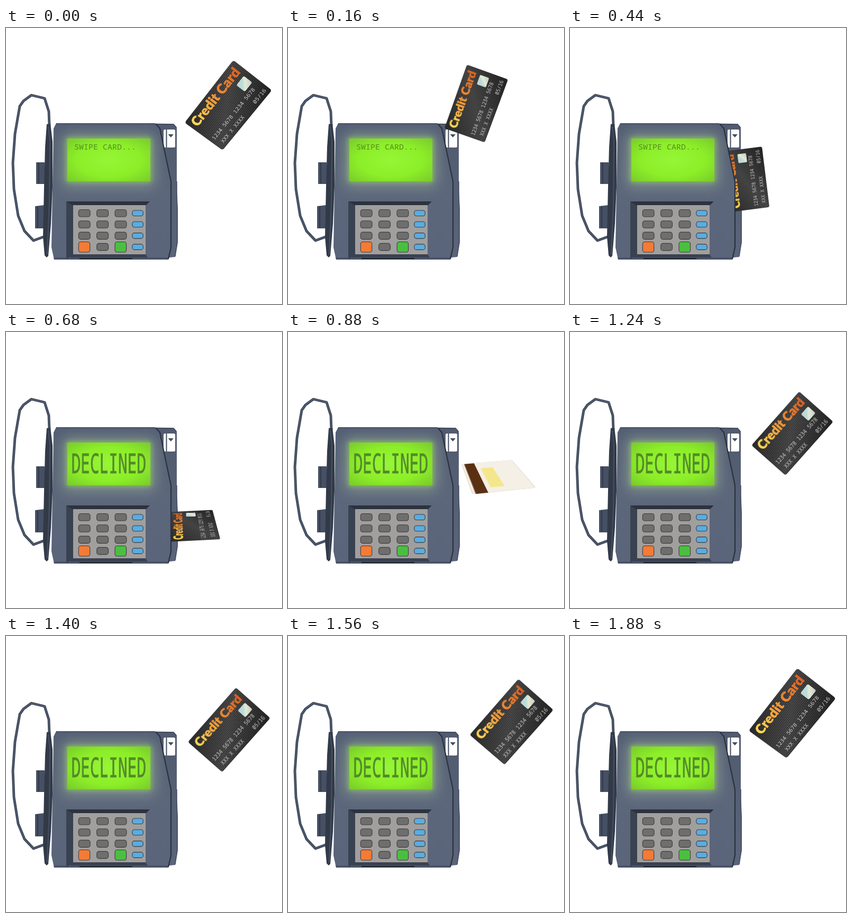
Recreate the animation shown at these times as an HTML page. Size 522x522 px, loop 1920 ms.

```html
<!DOCTYPE html>
<html lang="en">
<head>
<meta charset="utf-8">
<title>Card declined</title>
<style>
  html, body { margin: 0; width: 100%; height: 100%; overflow: hidden; background: #fff; }
  #stage { position: relative; width: 522px; height: 522px; overflow: hidden; }
  .layer { position: absolute; left: 0; top: 0; width: 522px; height: 522px; }
  #card { position: absolute; left: -68px; top: -43px; width: 136px; height: 86px; transform-origin: 50% 50%; }
  .mono { font-family: "Noto Sans Mono", "Liberation Mono", monospace; }
</style>
</head>
<body>
<div id="stage">
  <!-- handset and card slot -->
  <svg class="layer" viewBox="0 0 522 522">
    <defs>
      <linearGradient id="side" x1="0" y1="0" x2="0" y2="1">
        <stop offset="0" stop-color="#515b6f"/><stop offset="1" stop-color="#5a647a"/>
      </linearGradient>
      <path id="cord" d="M71 395L52 402L35 384L23 355L15 305L13 255L17 200L26 148L33 138L48 127L73 133L81 158L82 186"/>
    </defs>
    <g fill="none" stroke-linejoin="round">
      <use href="#cord" stroke="#394354" stroke-width="4.800"/>
      <use href="#cord" stroke="#556075" stroke-width="1.800"/>
    </g>
    <path d="M57 254H73V295H57ZM55 337L72 335V379H55Z" fill="#465064"/>
    <path d="M62 255V294M60 337V378" stroke="#323a49" stroke-width="2"/>
    <path d="M77 182L84 181L88 215V300L85 370L80 431L77 434L73 430L70 395L72 300L74 225Z" fill="#323a48"/>
    <path d="M80 186L83 215L82 330L78 428" fill="none" stroke="#465064" stroke-width="2"/>
    <path d="M280 181L317 182L323 188V310L325 345V405L320 433L300 435Z" fill="url(#side)"/>
    <path d="M285 181.500L317 182L322 188" fill="none" stroke="#3a4353" stroke-width="1.500"/>
    <path d="M323 290V310L324 345V405L320 432" fill="none" stroke="#434d60" stroke-width="1.500"/>
    <rect x="298" y="192" width="22" height="34" rx="2.500" fill="#fff"/>
    <path d="M303.500 192V226" stroke="#454d5c" stroke-width="2"/>
    <path d="M306.500 201H317L311.800 207Z" fill="#454d5c"/>
  </svg>

  <svg id="card" viewBox="0 0 136 86">
    <defs>
      <linearGradient id="black" x1="0" y1="0" x2="1" y2="1">
        <stop offset="0" stop-color="#2d2d2d"/><stop offset=".48" stop-color="#4c4c4c"/>
        <stop offset="1" stop-color="#242424"/>
      </linearGradient>
      <linearGradient id="gold" gradientUnits="userSpaceOnUse" x1="7" y1="0" x2="128" y2="0">
        <stop offset="0" stop-color="#ffdc58"/><stop offset=".45" stop-color="#f29a38"/>
        <stop offset="1" stop-color="#da5f22"/>
      </linearGradient>
      <linearGradient id="foil" x1="0" y1="0" x2="1" y2="1">
        <stop offset="0" stop-color="#c9cfd0"/><stop offset=".4" stop-color="#b9dedd"/>
        <stop offset=".55" stop-color="#e6ead0"/><stop offset="1" stop-color="#c3cacc"/>
      </linearGradient>
      <pattern id="lines" width="4" height="3" patternUnits="userSpaceOnUse">
        <rect width="4" height="1" fill="#111" opacity=".45"/>
      </pattern>
    </defs>
    <g id="front">
      <rect width="136" height="86" rx="4" fill="url(#black)"/>
      <rect width="136" height="86" rx="4" fill="url(#lines)"/>
      <text x="7" y="23.500" font-family="Lato, sans-serif" font-weight="900" font-size="23.500" fill="url(#gold)" stroke="url(#gold)" stroke-width=".5">Credit Card</text>
      <rect x="106" y="31" width="20" height="19" rx="2.500" fill="url(#foil)"/>
      <g class="mono" font-size="10" fill="#cbcbcb">
        <text x="6" y="62.500">1234 5678 1234 5678</text>
        <text x="11" y="79">XXX X XXXX</text>
        <text x="100" y="79">05/16</text>
      </g>
    </g>
    <g id="back">
      <rect x=".4" y=".4" width="135.200" height="85.200" rx="4" fill="#f4f0e6" stroke="#d3cbb9" stroke-width=".8"/>
      <rect y="4.500" width="136" height="16.500" fill="#5a3013"/>
      <rect x="31" y="27.500" width="87" height="19.500" fill="#f4e68c"/>
    </g>
  </svg>

  <!-- terminal body -->
  <svg class="layer" viewBox="0 0 522 522">
    <defs>
      <linearGradient id="shell" x1="0" y1="0" x2="0" y2="1">
        <stop offset="0" stop-color="#535e73"/><stop offset=".5" stop-color="#5c677b"/>
        <stop offset="1" stop-color="#5a647a"/>
      </linearGradient>
      <radialGradient id="lcd" cx=".5" cy=".5" r=".72">
        <stop offset="0" stop-color="#96f636"/><stop offset=".55" stop-color="#8cee28"/>
        <stop offset="1" stop-color="#78c82c"/>
      </radialGradient>
      <filter id="blur" x="-40%" y="-60%" width="180%" height="220%"><feGaussianBlur stdDeviation="13"/></filter>
      <filter id="soft" x="-20%" y="-30%" width="140%" height="160%"><feGaussianBlur stdDeviation="4"/></filter>
      <clipPath id="shellClip"><use href="#shellShape"/></clipPath>
    </defs>
    <path id="shellShape" d="M95 180H282L291 190L312 290V415L307 438H91L86 415L90 190Z" fill="url(#shell)"/>
    <g clip-path="url(#shellClip)">
      <rect x="107" y="200" width="175" height="100" rx="10" fill="#8ea295" opacity=".75" filter="url(#blur)"/>
      <rect x="114" y="207" width="161" height="85" rx="4" fill="#8cc55a" opacity=".75" filter="url(#soft)"/>
      <path d="M95 181H282" stroke="#485266" stroke-width="2"/>
      <path d="M87 434H311V439H87Z" fill="#4a5468"/>
    </g>
    <path d="M283 181L291 190L312 290V415L307 437" fill="none" stroke="#2b323e" stroke-width="2.200"/>
    <path d="M139 436H239" stroke="#20262f" stroke-width="2"/>

    <rect x="116" y="209" width="157" height="81" fill="url(#lcd)"/>
    <text id="prompt" class="mono" x="129" y="230" font-size="15" fill="#558f22">SWIPE CARD...</text>
    <text id="verdict" class="mono" transform="translate(123.500 266.500) scale(1 1.700)" font-size="29.500" fill="#55892a" stroke="#55892a" stroke-width=".6">DECLINED</text>

    <path d="M114 328H272L264 336H127V429L114 437Z" fill="#2c333f"/>
    <path d="M114 328L127 336V429L114 437Z" fill="#394251"/>
    <path d="M127 428H264L268 434H120Z" fill="#394251"/>
    <rect x="127" y="335" width="137" height="93" fill="#a19f9e"/>
    <g id="keys" stroke="#3c3c3c" stroke-width="1.100"></g>
  </svg>
</div>
<script>
const LOOP = 1920, STEP = 40, DECLINE_AT = 600;
const $ = id => document.getElementById(id);

// time, x, y, length scale, height scale, spin, tilt
const poses = [
  [0, 419.5, 148.7, 1.11, 1.065, -50.2, -14],
  [160, 355.5, 144, 0.945, 0.95, -68.3, -8],
  [440, 333, 286.5, 0.85, 0.87, -95.2, -3],
  [560, 338, 393, 0.87, 0.88, -95, 0],
  [880, 391, 270, 1.26, 1.26, -79.5, 251],
  [1120, 419, 197, 1.01, 1, -48, 355],
  [1240, 420.5, 192, 1, 1, -46.4, 359],
  [1560, 422.5, 163.5, 1.03, 1.02, -46.8, 354],
  [1880, 419.5, 148.7, 1.11, 1.065, -50.2, 346],
  [1920, 419.5, 148.7, 1.11, 1.065, -50.2, 346]
];

const slope = (i, c) => (poses[i + 1][c] - poses[i][c]) / (poses[i + 1][0] - poses[i][0]);

// monotone cubic tangents keep the motion smooth without overshoot
function tangent(i, c) {
  if (i === 0 || i === poses.length - 1) return 0;
  const a = slope(i - 1, c), b = slope(i, c);
  return a * b <= 0 ? 0 : 2 * a * b / (a + b);
}

function poseAt(t) {
  let i = 0;
  while (i < poses.length - 2 && t >= poses[i + 1][0]) i++;
  const p = poses[i], q = poses[i + 1], h = q[0] - p[0], u = (t - p[0]) / h, v = 1 - u;
  return p.slice(1).map((value, k) => {
    const c = k + 1;
    return value * v * v * (1 + 2 * u) + q[c] * u * u * (3 - 2 * u)
      + h * u * v * (v * tangent(i, c) - u * tangent(i + 1, c));
  });
}

function addKey(x, y, w, h, fill) {
  const key = document.createElementNS("http://www.w3.org/2000/svg", "rect");
  const attrs = { x, y, width: w, height: h, rx: 4, fill };
  for (const name in attrs) key.setAttribute(name, attrs[name]);
  $("keys").append(key);
}

for (let row = 0; row < 4; row++) {
  const y = 343.5 + row * 21.3;
  for (let col = 0; col < 3; col++) {
    const x = 137.3 + col * 34.4;
    if (row === 3 && col !== 1) addKey(x, 404.5, 21.5, 19.5, col ? "#4abf3f" : "#f57a35");
    else addKey(x, y, 21.8, 13.5, "#6e6e6e");
  }
  addKey(238.8, y + 1.5, 20.5, 10.5, "#58ade2");
}

function render(time) {
  const t = Math.floor(time % LOOP / STEP) * STEP;
  const [x, y, sx, sy, spin, tilt] = poseAt(t);
  $("card").style.transform = `translate(${x}px, ${y}px) perspective(650px) rotate(-2deg) ` +
    `rotateX(${tilt}deg) rotate(${spin}deg) scale(${sx}, ${sy})`;
  const flipped = Math.cos(tilt * Math.PI / 180) < 0;
  $("front").style.display = flipped ? "none" : "";
  $("back").style.display = flipped ? "" : "none";

  const declined = t >= DECLINE_AT;
  $("prompt").style.display = declined ? "none" : "";
  $("verdict").style.display = declined ? "" : "none";
}

const start = performance.now();
function frame() {
  render(performance.now() - start);
  requestAnimationFrame(frame);
}
frame();
</script>
</body>
</html>
```
